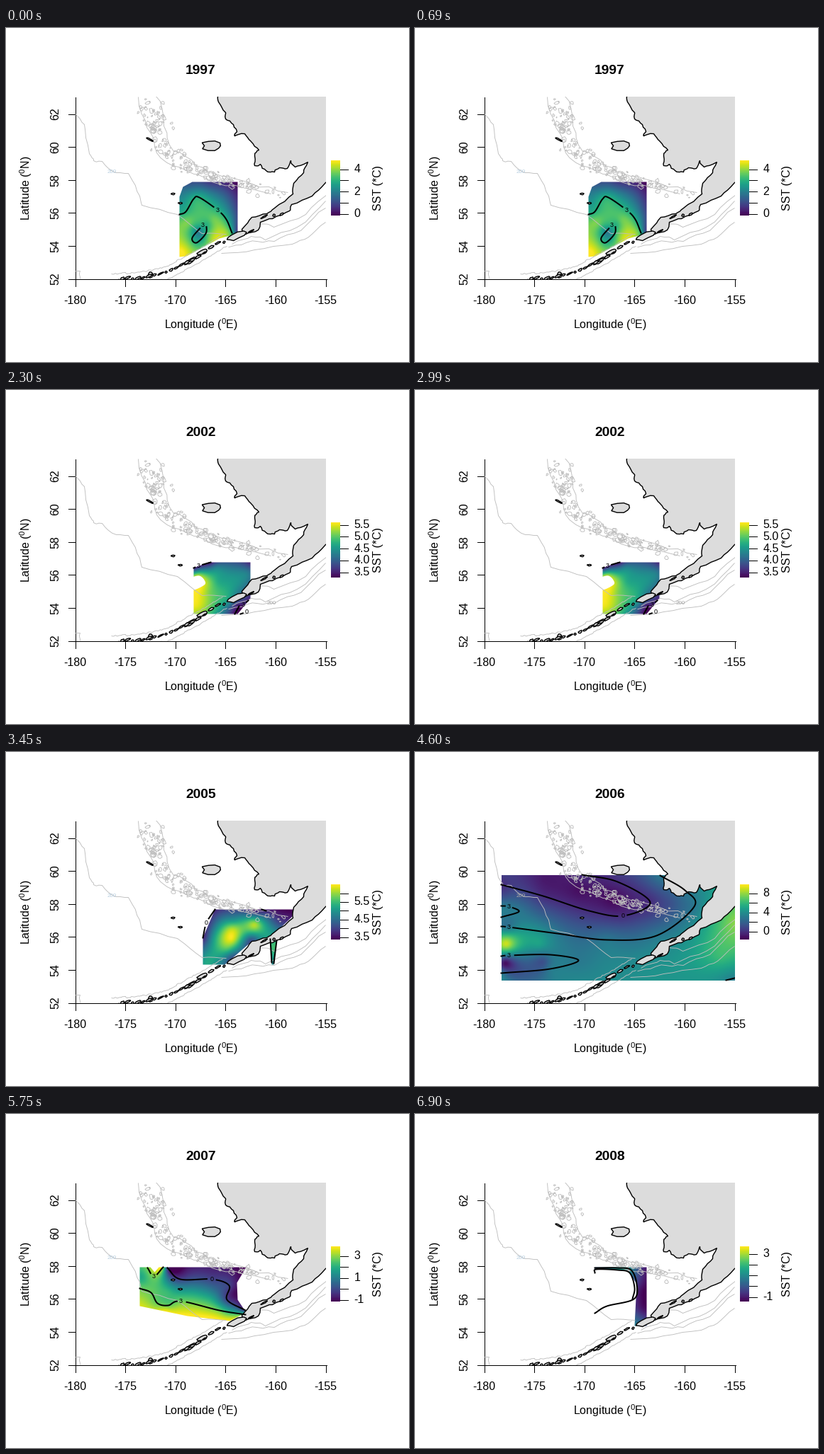
A matplotlib script for the animation above (8000 ms loop, 568x472 px).

```python
import numpy as np
import matplotlib.pyplot as plt
from matplotlib.animation import FuncAnimation
from matplotlib.collections import LineCollection
from matplotlib.patches import Polygon

W, H, DPI = 568, 472, 72
STEP, FRAMES, HOLD = 50, 160, 23      # each year stays for HOLD steps
LEFT, TOP, RIGHT, BOTTOM = 97, 97, 450, 354
GREY, BLUE = "#a8a8a8", "#b9cfe0"
plt.rcParams.update({
    "font.family": "Liberation Sans", "mathtext.fontset": "custom",
    "mathtext.rm": "Liberation Sans", "toolbar": "None"})
rng = np.random.default_rng(12)

fig = plt.figure(figsize=(W / DPI, H / DPI), dpi=DPI, facecolor="white")


def pixel_axes(x0, y0, x1, y1):
    """Axes whose data coordinates are stage pixels."""
    ax = fig.add_axes([x0 / W, 1 - (y1 + 1) / H, (x1 - x0 + 1) / W, (y1 - y0 + 1) / H])
    ax.axis("off")
    ax.set(xlim=(x0 - .5, x1 + .5), ylim=(y1 + .5, y0 - .5))
    ax.set_autoscale_on(False)
    return ax


page = pixel_axes(0, 0, W - 1, H - 1)
chart = pixel_axes(LEFT, TOP, RIGHT, BOTTOM)
limits = [(ax, ax.get_xlim(), ax.get_ylim()) for ax in (page, chart)]


def rough(points, amp=1.6, rounds=2):
    """Subdivide a path with random midpoint shifts."""
    p = np.array(points, float)
    for _ in range(rounds):
        mid = (p[1:] + p[:-1]) / 2 + rng.uniform(-amp, amp, (len(p) - 1, 2))
        out = np.empty((len(p) * 2 - 1, 2))
        out[::2], out[1::2] = p, mid
        p, amp = out, amp * .6
    return p


def smooth(points, n=16):
    """Catmull-Rom curve through the points."""
    p = np.array(points, float)
    p = np.vstack([2 * p[0] - p[1], p, 2 * p[-1] - p[-2]])
    t = np.linspace(0, 1, n, endpoint=False)[:, None]
    parts = [b + t * (c - a) / 2 + t**2 * (2 * a - 5 * b + 4 * c - d) / 2
             + t**3 * (3 * b - a - 3 * c + d) / 2
             for a, b, c, d in zip(p, p[1:], p[2:], p[3:])]
    return np.vstack(parts + [p[-2:-1]])


def blob(x, y, rx, ry, tilt=0.0, n=10, wobble=.25):
    a = np.linspace(0, 2 * np.pi, n + 1)
    r = rng.uniform(1 - wobble, 1 + wobble, n + 1)
    r[-1] = r[0]
    u, v = rx * r * np.cos(a), ry * r * np.sin(a)
    c, s = np.cos(tilt), np.sin(tilt)
    return np.column_stack([x + c * u - s * v, y + s * u + c * v])


def line(xs, ys):
    return page.plot(xs, ys, color="black", lw=1)[0]


def label(x, y, s, size=16, ax=page, **kw):
    return ax.text(x, y, s, fontsize=size, **{"ha": "center", "va": "center", **kw})


def land(points):
    chart.add_patch(Polygon(points, fc="#dcdcdc", ec="black", lw=1.4, zorder=3))


# ---- land -------------------------------------------------------------

mainland = [
    (298, 90), (299, 104), (309, 119), (309, 128), (320, 136), (325, 146), (322, 152),
    (336, 149), (344, 159), (356, 172), (350, 180), (350, 194), (358, 192), (366, 201),
    (378, 203), (385, 197), (396, 198), (401, 187), (407, 196), (425, 189), (419, 204),
    (405, 219), (404, 234), (378, 254), (367, 262), (346, 267), (332, 284), (337, 291),
    (355, 285), (358, 274), (375, 269), (399, 258), (402, 249), (431, 237), (450, 218)]
land(np.vstack([rough(mainland, 1.5), [(RIGHT + 9, 212), (RIGHT + 9, 90)]]))
for island in [(289, 166, 13, 6), (323, 294, 14, 4.5, -.35), (202, 157, 5, 1, .5),
               (276, 316, 9, 3, -.5), (259, 329, 8, 2.5, -.6), (235, 234, 2.5, 1),
               (245, 247, 2.5, 1), (203, 349, 3, 4)]:
    land(blob(*island))

chain = smooth([(307, 300), (262, 326), (225, 345), (185, 353), (150, 355)], 5)
for x, y in np.vstack([chain, [(345, 287), (363, 268), (377, 265), (388, 262)]]):
    land(blob(x, y + rng.normal(0, 1), rng.uniform(1.5, 5), rng.uniform(.7, 1.8), -.5))

# ---- depth lines ------------------------------------------------------

band = np.array([(198, 97), (210, 140), (224, 176), (255, 196), (292, 211),
                 (335, 222), (385, 234)])
shelf = [(97, 121), (110, 136), (117, 177), (123, 187), (135, 188), (155, 204),
         (172, 205), (188, 237), (191, 250), (241, 263), (276, 290), (310, 291)]
outer = np.array([(303, 318), (350, 313), (403, 305), (426, 295), (450, 274)])
inner = np.array([(318, 305), (345, 294), (365, 299), (410, 281), (450, 244)])
depth = [rough(p, amp, 2) for p, amp in (
    (shelf, 1.8), (band - (12, 0), 4), (band + (12, -2), 4), (outer, 1.5), (inner, 2.5),
    ((outer + inner * 2) / 3, 2.5), (inner + (12, -18), 3), (chain + (-2, -8), 1.5),
    (chain + (4, 8), 1.5), ([(97, 343), (104, 343), (104, 354)], 1))]
for _ in range(165):
    t = rng.uniform(0, 1)**1.25 * (len(band) - 1)
    x, y = (np.interp(t, range(len(band)), band[:, i]) for i in (0, 1))
    spread = 13 - 1.4 * t
    size = rng.uniform(.8, 3.4)
    depth.append(blob(x + rng.normal(0, spread), y + rng.normal(0, spread * .6),
                      size, size * rng.uniform(.5, 1.2), rng.uniform(0, 3), 7, .45))
chart.add_collection(LineCollection(depth, colors="#bebebe", linewidths=.9, zorder=2),
                     autolim=False)

# ---- axes and fixed text ----------------------------------------------

line([LEFT, LEFT, RIGHT + 1], [TOP, BOTTOM, BOTTOM])
for k in range(6):
    x, y = LEFT + 70.6 * k, BOTTOM - 46.6 * k
    line([x, x], [BOTTOM, BOTTOM + 10])
    line([LEFT - 10, LEFT], [y, y])
    label(x, 385, str(5 * k - 180))
    label(69, y, str(52 + 2 * k), rotation=90)
label(274, 419, r"Longitude ($\mathregular{^0}$E)")
label(28, 226, r"Latitude ($\mathregular{^0}$N)", rotation=90)
label(524, 226, "SST (*C)", rotation=90)
page.imshow(np.linspace(1, 0, 64)[:, None], cmap="viridis", aspect="auto",
            extent=(457.5, 470.5, 264.5, 186.5))

# ---- yearly temperature maps ------------------------------------------


def field(nodes, x0, y0, x1, y1):
    """Multiquadric surface through (x, y, value) nodes, limited to 0..1."""
    n = np.array(nodes, float)

    def kernel(x, y):
        return np.sqrt((x[:, None] - n[:, 0])**2 + (y[:, None] - n[:, 1])**2 + 36)

    weights = np.linalg.solve(kernel(n[:, 0], n[:, 1]), n[:, 2] - .5)
    gx, gy = np.meshgrid(np.arange(x0, x1 + 1), np.arange(y0, y1 + 1))
    z = kernel(gx.ravel(), gy.ravel()) @ weights + .5
    return np.clip(z, 0, 1).reshape(gx.shape)


scenes = []


def add_year(year, edge, nodes, curves, ticks, holes=(), note=(149, 203, BLUE)):
    """curves: (value or None, points[, text, index of the labelled point]);
    ticks: first y, spacing, labels from the top ('' for a bare tick)."""
    art, paths, nodes = [], [], list(nodes)
    for value, points, *mark in curves:
        path = smooth(points)
        if mark:
            x, y = points[mark[1]]
            art.append(label(x, y, mark[0], 9, chart, zorder=5))
            path[np.hypot(*(path - (x, y)).T) < 5.5] = np.nan
        paths.append(path)
        if value is not None:
            nodes += [(x, y, value) for x, y in points]
    (x0, y0), (x1, y1) = np.min(edge, 0), np.max(edge, 0)
    image = chart.imshow(field(nodes, x0, y0, x1, y1), cmap="viridis", vmin=0, vmax=1,
                         extent=(x0 - .5, x1 + .5, y1 + .5, y0 - .5), aspect="auto",
                         zorder=1)
    image.set_clip_path(Polygon(edge, transform=chart.transData))
    art.append(image)
    art += [chart.add_patch(Polygon(smooth(h + h[:1]), fc="white", ec="none", zorder=1.5))
            for h in holes]
    art += [chart.plot(*p.T, color="black", lw=2, zorder=4)[0] for p in paths]
    x, y, color = note
    art.append(label(x, y, "200", 8, chart, color=color, zorder=2.5))
    art.append(label(274, 60, str(year), 19.3, weight="bold"))
    top, gap, names = ticks
    for k, name in enumerate(names):
        y = top + gap * k
        art += [line([470.5, 481], [y, y]), label(490, y, name, ha="left")]
    scenes.append(art)


add_year(
    1997,
    [(244, 323), (244, 238), (249, 224), (262, 217), (326, 217), (326, 290), (300, 297),
     (254, 322)],
    [(326, 218, 0), (285, 219, .2), (258, 222, .3), (246, 242, .48), (255, 275, .8),
     (248, 315, 1), (292, 271, .78), (295, 298, .94), (272, 289, .42), (325, 255, .2),
     (305, 240, .38), (325, 288, .2)],
    [(.63, [(244, 263), (253, 259), (264, 241), (272, 239), (298, 257), (310, 270),
            (318, 289)], "3", 4),
     (.63, [(277, 278), (262, 296), (268, 303), (281, 290), (277, 278)][:-1]
      + [(282, 277.5)], "3", 0)],
    (199, 15.8, ["4", "", "2", "", "0"]))

rim_left = [(235, 250), (250, 222), (280, 202), (288, 190)]
rim_right = [(308, 190), (316, 205), (341, 219)]
add_year(
    2000,
    rim_left + rim_right + [(341, 285), (263, 285), (235, 266)],
    [(268, 234, 1), (290, 225, .9), (298, 192, .75), (298, 215, .8), (255, 250, .85),
     (270, 263, .95), (250, 268, .35), (300, 237, .6), (311, 253, .95), (328, 272, .95),
     (338, 265, .35), (335, 238, 0)],
    [(.12, rim_left), (.3, [(x + 7, y + 5) for x, y in rim_left]),
     (.12, rim_right), (None, [(x - 4, y + 4) for x, y in rim_right]),
     (.22, [(341, 229), (317, 234), (320, 245), (341, 250)]),
     (None, [(341, 233), (323, 238), (341, 243)]),
     (None, [(235, 262), (268, 285)]), (None, [(235, 268), (241, 281), (260, 285)], "0", 1),
     (.35, [(281, 285), (283, 265), (291, 263), (294, 285)]),
     (None, [(323, 257), (335, 266), (341, 270)], "3", 1)],
    (204, 16, ["", "6", "", "2"]),
    [[(251, 240), (264, 226), (276, 223), (287, 235), (270, 243)],
     [(297, 285), (297, 252), (303, 248), (320, 262), (333, 285)],
     [(330, 238), (336, 236), (340, 239)]])

add_year(
    2002,
    [(264, 251), (285, 243), (344, 243), (344, 294), (326, 316), (264, 316)],
    [(295, 249, .4), (343, 245, .15), (340, 258, .42), (268, 262, .88), (280, 272, .93),
     (266, 305, .97), (285, 285, .82), (300, 270, .6), (285, 311, .76), (314, 295, .56),
     (330, 270, .5)],
    [(.08, [(264, 251), (271, 248), (288, 243)], "3", 1),
     (.05, [(322, 316), (328, 305)]), (.1, [(334, 303), (341, 297)], "3", 0),
     (None, [(330, 316), (339, 313)], "0", 1)],
    (190, 16.8, ["5.5", "5.0", "4.5", "4.0", "3.5"]),
    [[(261, 264), (272, 262), (279, 268), (279, 275), (261, 282)]], (374, 301, GREY))

add_year(
    2005,
    [(277, 300), (277, 262), (294, 222), (405, 222), (403, 232), (376, 258), (381, 264),
     (377, 300), (374, 300), (373, 260), (345, 268), (308, 300)],
    [(350, 224, .1), (402, 224, 0), (385, 240, .2), (345, 266, .25), (318, 291, .25),
     (282, 297, .6), (290, 262, .48), (320, 238, .55), (368, 238, .42), (350, 243, .88),
     (318, 250, .9), (318, 264, .97), (311, 278, .72), (377, 275, .7)],
    [(.1, [(294, 222), (282, 241), (277, 262)], "0", 1), (None, [(360, 222), (366, 224)]),
     (None, [(372, 264), (374, 297)]), (None, [(381, 266), (377, 298)])],
    (199, 12.4, ["", "5.5", "", "4.5", "", "3.5"]))

add_year(
    2006,
    [(121, 173), (RIGHT, 173), (RIGHT, 322), (121, 322)],
    [(280, 208, .02), (230, 193, .04), (180, 180, .07), (128, 175, .18), (121, 205, .25),
     (128, 271, .92), (175, 271, .57), (175, 232, .34), (360, 212, .25), (310, 245, .25),
     (126, 297, .05), (180, 295, .25), (230, 320, .46), (330, 300, .5), (400, 176, .47),
     (430, 290, .68), (RIGHT, 240, .82), (RIGHT, 322, .42)],
    [(.13, [(121, 187), (180, 203), (245, 224), (293, 231), (331, 212), (285, 183),
            (235, 173)], "0", 3),
     (.4, [(121, 246), (132, 247), (200, 256), (270, 265), (340, 259), (393, 218),
           (380, 195), (345, 174)], "3", 1),
     (.4, [(121, 217), (132, 218), (146, 225), (121, 233)], "3", 1),
     (.4, [(121, 288), (132, 287), (190, 286), (230, 294), (190, 306), (121, 312)], "3", 1),
     (None, [(438, 322), (RIGHT, 319)])],
    (199, 13.5, ["8", "", "4", "", "0"]), note=(149, 203, GREY))

add_year(
    2007,
    [(188, 216), (203, 216), (209, 223), (215, 216), (338, 216), (325, 238), (326, 262),
     (338, 280), (315, 292), (255, 285), (188, 271)],
    [(190, 230, .6), (190, 268, .92), (225, 277, .96), (310, 289, .95), (228, 250, .66),
     (262, 250, .55), (290, 260, .57), (255, 220, .08), (330, 220, 0), (320, 252, .05),
     (330, 268, .08)],
    [(.77, [(188, 246), (204, 252), (213, 267), (228, 270), (246, 264), (300, 277),
            (337, 283)], "3", 4),
     (.8, [(199, 217), (208, 229), (221, 216)], "3", 1),
     (.2, [(227, 217), (245, 233), (290, 233), (314, 242), (311, 262), (337, 277)],
      "0", 2)],
    (200, 15.6, ["3", "", "1", "", "-1"]))

add_year(
    2008,
    [(253, 216), (326, 216), (326, 299), (309, 299), (312, 240), (300, 220), (253, 219)],
    [(253, 217, .3), (297, 218, .55), (314, 232, .2), (322, 220, .1), (318, 250, .04),
     (320, 275, .06), (312, 297, .4), (325, 298, .25)],
    [(None, [(253, 217), (285, 217), (304, 220), (312, 240), (308, 261), (270, 271),
             (253, 281)]),
     (None, [(253, 224), (255, 219), (285, 220), (302, 224), (309, 245), (306, 261)])],
    (197, 15.3, ["3", "", "", "", "-1"]))

for ax, xlim, ylim in limits:
    ax.set(xlim=xlim, ylim=ylim)


def update(i):
    current = min(i // HOLD, len(scenes) - 1)
    for k, art in enumerate(scenes):
        for a in art:
            a.set_visible(k == current)
    return []


anim = FuncAnimation(fig, update, frames=FRAMES, interval=STEP, repeat=True,
                     repeat_delay=0, blit=False)
plt.show()
```
